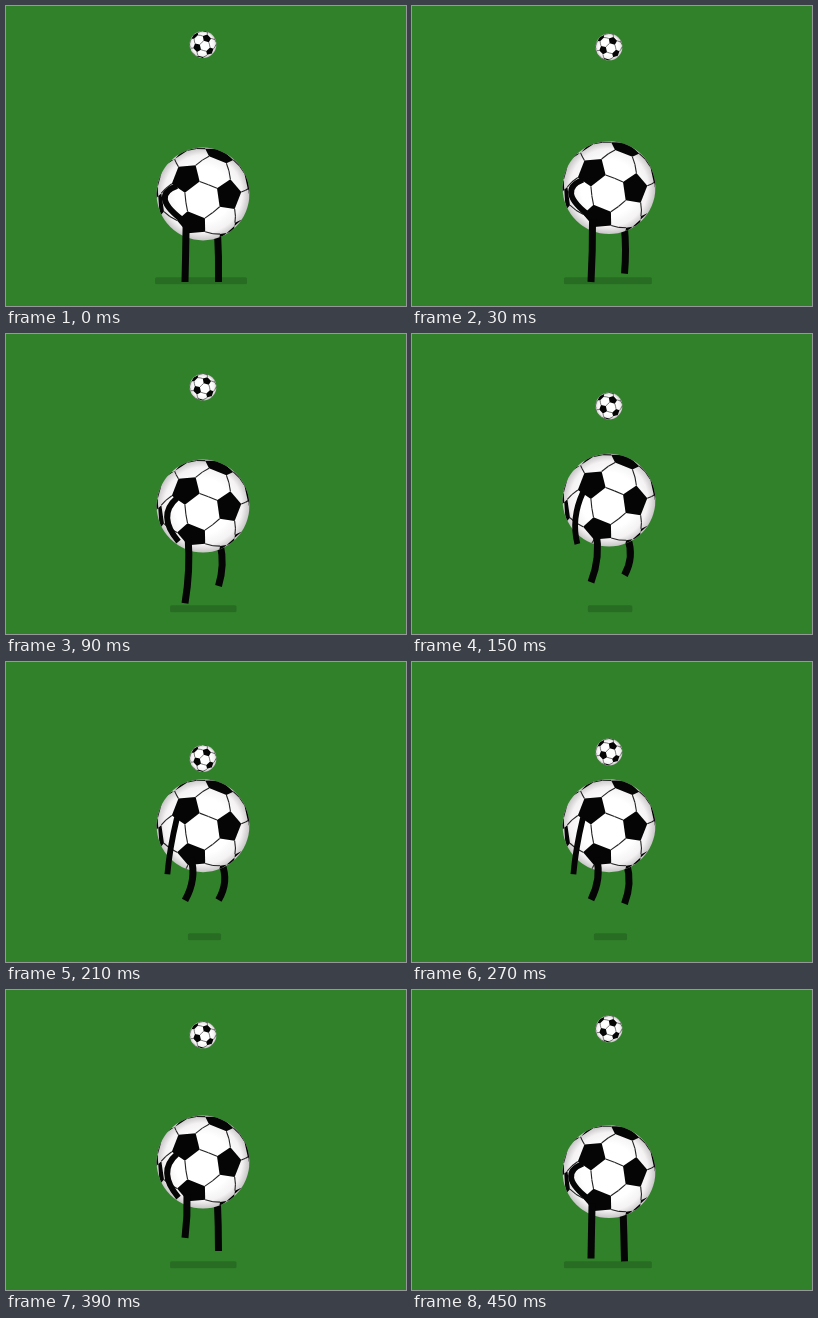
Animation of 400 by 300 pixels, one loop 0.48 s. Source, as an HTML page with a canvas:

```html
<!DOCTYPE html>
<html>
<head>
<meta charset="utf-8">
<style>
html, body { margin: 0; width: 100%; height: 100%; overflow: hidden; background: #31812b; }
canvas { display: block; }
</style>
</head>
<body>
<canvas id="stage" width="400" height="300"></canvas>
<script>
const ctx = document.getElementById('stage').getContext('2d');
const LOOP = 480, STEP = 30, CENTER = 197, GROUND = 276;
const BLACK = '#050505';

const dot = (a, b) => a[0] * b[0] + a[1] * b[1] + a[2] * b[2];
const blend = (a, p, b, q) => a.map((n, i) => n * p + b[i] * q);
const unit = a => a.map(n => n / Math.sqrt(dot(a, a)));
const cross = (a, b) => [
  a[1] * b[2] - a[2] * b[1], a[2] * b[0] - a[0] * b[2], a[0] * b[1] - a[1] * b[0]
];
const lerp = (a, b, u) => a + (b - a) * u;

// A truncated icosahedron, turned so that two neighbouring patches face the given points.
function makeBall(radius, first, second, seamWidth) {
  const onSphere = ([x, y]) => unit([x, y, Math.sqrt(radius * radius - x * x - y * y)]);
  const pole = onSphere(first), next = onSphere(second);
  const side = unit(blend(next, 1, pole, -dot(next, pole)));
  const up = cross(pole, side);
  const centers = [pole];
  for (let k = 0; k < 5; k++) {
    const angle = k * Math.PI * 2 / 5;
    const around = blend(side, Math.cos(angle), up, Math.sin(angle));
    centers.push(blend(pole, 1 / Math.sqrt(5), around, 2 / Math.sqrt(5)));
  }
  centers.push(...centers.map(c => c.map(n => -n)));

  const between = (p, q, share) => unit(blend(p, 1 - share, q, share));
  const project = p => {
    const scale = p[2] < 0 ? 1.05 / Math.hypot(p[0], p[1]) : 1;
    return [p[0] * scale * radius, p[1] * scale * radius];
  };
  const patches = [], seams = [];
  for (const p of centers) {
    const near = centers.filter(q => q !== p && dot(p, q) > 0.4);
    if (p[2] > -0.3) {
      const corners = near.map(q => between(p, q, 1 / 3));
      const angle = c => Math.atan2(c[1] - p[1], c[0] - p[0]);
      patches.push(corners.sort((a, b) => angle(a) - angle(b)).map(project));
    }
    for (const q of near) {
      const middle = between(p, q, 1 / 2);
      if (middle[2] > 0) seams.push([between(p, q, 1 / 3), middle].map(project));
    }
  }
  return { radius, patches, seams, seamWidth };
}

const body = makeBall(46.4, [-18, -17], [27, 1], 1.1);
const toy = makeBall(13.4, [4, -6.5], [-5.5, 2.5], 0.6);

function trace(points) {
  ctx.beginPath();
  for (const [x, y] of points) ctx.lineTo(x, y);
}

function drawBall({ radius, patches, seams, seamWidth }, y) {
  ctx.save();
  ctx.translate(CENTER, y);
  ctx.beginPath();
  ctx.arc(0, 0, radius, 0, Math.PI * 2);
  const shade = ctx.createRadialGradient(0, 0, radius * 0.6, 0, 0, radius);
  shade.addColorStop(0, '#ffffff');
  shade.addColorStop(0.6, '#f4f2f3');
  shade.addColorStop(1, '#c8c5c6');
  ctx.fillStyle = shade;
  ctx.fill();
  ctx.clip();
  ctx.lineWidth = seamWidth;
  ctx.strokeStyle = '#222';
  for (const seam of seams) {
    trace(seam);
    ctx.stroke();
  }
  ctx.fillStyle = BLACK;
  for (const patch of patches) {
    trace(patch);
    ctx.fill();
  }
  ctx.restore();
}

// A limb bends through its middle point; all points are relative to the body.
function drawLimb(y, [x0, y0], [mx, my], [x1, y1], width) {
  ctx.save();
  ctx.translate(CENTER, y);
  ctx.beginPath();
  ctx.moveTo(x0, y0);
  ctx.quadraticCurveTo(2 * mx - (x0 + x1) / 2, 2 * my - (y0 + y1) / 2, x1, y1);
  ctx.lineWidth = width;
  ctx.strokeStyle = BLACK;
  ctx.stroke();
  ctx.restore();
}

const wave = (t, peak) => (1 + Math.cos((t - peak) / LOOP * Math.PI * 2)) / 2;

function drawLeg(y, hipX, hipY, footX, reach, bend) {
  const footY = Math.min(74 + reach, GROUND - y);
  const kneeX = (hipX + footX) / 2 + 7 * bend;
  drawLimb(y, [hipX + 5 * bend, hipY], [kneeX, (hipY + footY) / 2], [footX, footY], 7);
}

function drawArm(y, swing) {
  const elbow = [lerp(-38, -32, swing), lerp(6, 22, swing)];
  const hand = [lerp(-18, -36, swing), lerp(28, 49, swing)];
  drawLimb(y, [-26, -8], elbow, hand, 5.8);
}

function tossY(t) {
  const fall = 33.5 * (t / 150) ** 1.63;
  const rise = 51.5 * ((LOOP - t) / 210) ** 2.45;
  return 38.5 + Math.min(fall, rise, 65);
}

function draw(t) {
  const lift = 1 - Math.abs(t / 240 - 1) ** 2.25;
  const y = 188 - 24.5 * lift;

  ctx.fillStyle = '#31812b';
  ctx.fillRect(0, 0, 400, 300);

  const shadow = 92 - 60 * lift ** 2;
  ctx.fillStyle = '#286c24';
  ctx.beginPath();
  ctx.roundRect(195 + 3.5 * lift - shadow / 2, 271.3, shadow, 7, 1.5);
  ctx.fill();

  drawLeg(y, 14, 38, 15.5, 16 * wave(t, 430), wave(t, 190));
  drawBall(body, y);
  drawLeg(y, -17, 32, -18, 28 * wave(t, 50) ** 2.7, wave(t, 220));
  drawArm(y, lift ** 2.4);
  drawBall(toy, tossY(t));
}

const start = performance.now();
function tick() {
  const t = (performance.now() - start) % LOOP;
  draw(Math.floor(t / STEP) * STEP);
  requestAnimationFrame(tick);
}
draw(0);
requestAnimationFrame(tick);
</script>
</body>
</html>
```
